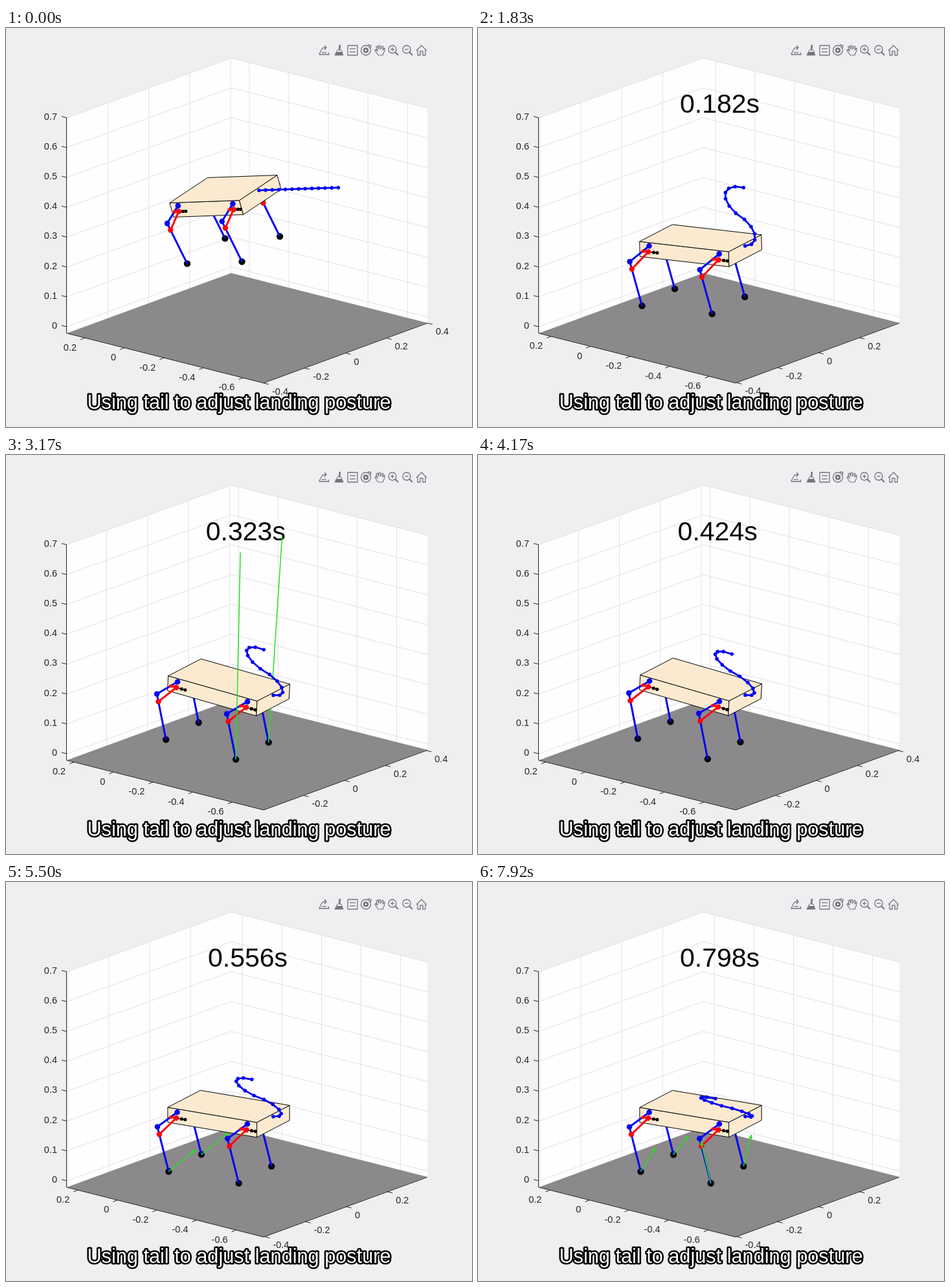
These frames come from a looping animation (720 px wide and 617 px high, 8 s). An HTML page with a canvas:

```html
<!DOCTYPE html>
<html lang="en">
<head>
<meta charset="utf-8">
<title>Landing posture</title>
<style>
html, body { margin: 0; width: 100%; height: 100%; overflow: hidden; background: #f0eef1; }
canvas { display: block; }
</style>
</head>
<body>
<canvas id="stage" width="720" height="617"></canvas>
<script>
const ctx = document.getElementById('stage').getContext('2d');
const LOOP = 8000, STEPS = [80, 170, 330, 420];
const BACK = '#f0eef1', INK = '#262626', TOOL = '#757478';
const BLUE = '#0505f0', RED = '#fa0510', BLACK = '#050505', GREEN = '#25e025';
const SANS = '"Liberation Sans", Arial, sans-serif';

const clamp = v => Math.max(0, Math.min(1, v));
const lerp = (a, b, k) => a + (b - a) * k;
const smooth = (from, to, n) => {
  const s = clamp((n - from) / (to - from));
  return s * s * (3 - 2 * s);
};
const add = (p, q, k = 1) => p.map((v, i) => v + q[i] * k);
const range = count => [...Array(count).keys()];

// Forward tilt while the robot rocks after touchdown
const rock = n => smooth(20, 34, n) - smooth(43, 56, n);

// Screen vector of a world vector (rearward, sideways, up)
const project = (x, y, z) => [306 * x + 316 * y, 51 * x - 164 * y - 462 * z];

function trace(pts, close) {
  ctx.beginPath();
  pts.forEach(p => ctx.lineTo(p[0], p[1]));
  if (close) ctx.closePath();
}
function line(pts, color, width = 1) {
  trace(pts);
  ctx.strokeStyle = color;
  ctx.lineWidth = width;
  ctx.stroke();
}
function face(pts, fill, edge) {
  trace(pts, true);
  ctx.fillStyle = fill;
  ctx.fill();
  if (edge) { ctx.strokeStyle = edge; ctx.lineWidth = 1; ctx.stroke(); }
}
function dot(p, r, color) {
  ctx.beginPath();
  ctx.arc(p[0], p[1], r, 0, 7);
  ctx.fillStyle = color;
  ctx.fill();
}
function label(text, x, y, size, align = 'left', color = INK) {
  ctx.font = `${size}px ${SANS}`;
  ctx.textAlign = align;
  ctx.fillStyle = color;
  ctx.fillText(text, x, y);
}

// The axes follow the body, so the ticks slide along the floor edges
const tickX = n => 122 - 10.7 * smooth(0, 24, n) - 6.5 * rock(n);
const tickY = n => 524.5 - Math.min(n, 7) / 7 + 2.5 * smooth(6, 11, n) - 3.4 * rock(n);

function drawAxes(n) {
  const grid = '#e1e0e3', wall = '#fefdff';
  const left = x => 472 + (x - 94) * 0.2533, right = x => 549 - (x - 398) * 0.3665;
  const xs = range(5).map(i => [(1 - i) / 5, tickX(n) + 61.1 * i]);
  const ys = range(5).map(i => [(i - 2) / 5, tickY(n) + 63.25 * (i - 2)])
    .filter(([, x]) => x > 397.7 && x < 651.3);
  const zs = range(8).map(i => [i / 10, 462 - 46.17 * i]);

  face([[94, 139], [348, 47], [348, 379], [94, 472]], wall);
  face([[348, 47], [651, 124], [651, 456], [348, 379]], wall);
  for (const [, y] of zs) line([[94, y], [348, y - 92.5], [651, y - 15]], grid);
  for (const [, x] of xs) line([[x + 254, left(x) - 93], [x + 254, left(x) - 425]], grid);
  for (const [, x] of ys) line([[x - 304, right(x) - 77], [x - 304, right(x) - 410]], grid);
  face([[94, 472], [348, 379], [651, 456], [398, 549]], '#8b898b');
  line([[93.5, 139], [93.5, 472], [398, 549], [651, 456.5]], INK);

  for (const [v, y] of zs) {
    line([[94, y], [86, y - 2]], INK);
    label(String(v), 79, y + 3, 14.5, 'right');
  }
  for (const [v, x] of xs) {
    line([[x, left(x)], [x - 7, left(x) + 2.6]], INK);
    label(String(v), x - 13, left(x) + 19.5, 14.5, 'right');
  }
  for (const [v, x] of ys) {
    line([[x, right(x)], [x + 8, right(x) + 2]], INK);
    label(String(v), x + 13, right(x) + 18, 14.5);
  }
}

function drawTools() {
  const stroke = (width, ...pts) => line(pts, TOOL, width);
  const ring = (x, y, r) => {
    ctx.beginPath();
    ctx.arc(x, y, r, 0, 7);
    ctx.strokeStyle = TOOL;
    ctx.lineWidth = 1.3;
    ctx.stroke();
  };
  // export
  stroke(1.3, [486, 36], [484, 41], [499, 41], [498, 38]);
  stroke(1.3, [486, 36], [489, 31], [495, 30], [492, 27]);
  stroke(1.3, [495, 30], [492, 34]);
  stroke(1.3, [488, 38], [495, 38]);
  // brush
  stroke(2.6, [516, 26], [515, 34]);
  face([[512, 34], [518, 34], [521, 42], [508, 42]], BACK, TOOL);
  face([[511, 37], [519, 37], [521, 42], [508, 42]], TOOL);
  // data tip
  stroke(1.3, [528, 27], [543, 27], [543, 42], [528, 42], [528, 27]);
  stroke(1.3, [531, 32], [540, 32]);
  stroke(1.3, [531, 37], [540, 37]);
  // rotate
  ring(556, 34.5, 7.5);
  face([[556, 30], [560, 32], [560, 37], [556, 39], [552, 37], [552, 32]], TOOL);
  dot([556, 34.5], 1.5, BACK);
  stroke(1.3, [559, 26], [564, 27], [563, 32]);
  // hand
  stroke(1.2, [575, 42], [570, 35], [571, 33], [574, 36], [572, 29], [574, 28], [576, 33], [576, 27],
    [578, 27], [579, 33], [581, 28], [583, 29], [582, 34], [585, 31], [585, 35], [582, 42], [575, 42]);
  // zoom in and out
  for (const x of [597, 619]) {
    ring(x, 33, 6);
    stroke(2, [x + 4, 37], [x + 9, 42]);
    stroke(1.3, [x - 3, 33], [x + 3, 33]);
  }
  stroke(1.3, [597, 30], [597, 36]);
  // home
  stroke(1.3, [634, 35], [642, 27], [650, 35]);
  stroke(1.3, [636, 34], [636, 42], [640, 42], [640, 36], [644, 36], [644, 42], [648, 42], [648, 34]);
}

// Rigid body: free fall with fading yaw, roll and pitch, then a damped landing
function bodyFrame(n) {
  const yaw = 0.18 * clamp(1 - n / 18);
  const roll = 0.2 * clamp(1 - n / 18) ** 1.4;
  const pitch = 0.19 * clamp(1 - n / 22) - 0.082 * rock(n);
  const d = n - 20;
  const y = d < 0 ? 260 + 0.1 * n + 0.2308 * n * n : 358.5 + (9 * d - 4) * Math.exp(-d / 2.5);
  const center = [339 + 5 * clamp(n / 18), y];
  const rear = project(Math.cos(yaw) * Math.cos(pitch), -Math.sin(yaw), Math.sin(pitch));
  const side = project(Math.sin(yaw), Math.cos(yaw), Math.sin(roll));
  const down = project(Math.sin(pitch), Math.sin(roll), -1);
  const at = (a, b, c) => add(add(add(center, rear, a), side, b), down, c);
  return { rear, side, down, at };
}

// Ground force of a leg as a screen vector, or nothing
function force(n, hind, far) {
  const sway = 9 * Math.sin((79 - n) * 2.3);
  if (n < 21 || (n > 36 && n < 47)) return null;
  if (n < 28) return [3, -70 - 8 * (n - 21)];
  if (n < 37) return hind ? [far ? 21 : 7, -320 * (1 - Math.abs(n - 32) / 6)] : null;
  if (n < 56) return hind ? null : [41, -33];
  if (hind) return far ? [12 - sway, -48] : [sway - 15, -64];
  return n % 5 === 3 && !far ? [-78, -12] : [23 + sway, far ? -28 : -36];
}

function drawForce(foot, f) {
  const tip = add(foot, f), a = Math.atan2(f[1], f[0]);
  const barb = turn => add(tip, [Math.cos(a + turn), Math.sin(a + turn)], -6);
  line([foot, tip], GREEN, 1.5);
  if (Math.hypot(...f) < 90) line([barb(0.35), tip, barb(-0.35)], GREEN, 1.5);
}

function drawLeg(n, { at }, hind, far) {
  const a = hind ? 0.177 : -0.177, b = far ? 0.08 : -0.08;
  const hip = at(a, b, -0.014), knee = at(a - 0.1, b, 0.046), foot = at(a - 0.043, b, 0.189);
  const joint = knee.map((v, i) => lerp(v, foot[i], 0.168));
  const [outer, inner, pin, end] = [-0.032, -0.005, 0.022, 0.04].map(x => at(a + x, b, 0.006));
  line([inner, end], BLACK, 1.5);
  dot(foot, 5.2, BLACK);
  line([hip, knee, foot], BLUE, 3);
  line([outer, inner, joint], RED, 3);
  for (const p of [hip, knee]) dot(p, 4.3, BLUE);
  for (const p of [inner, joint]) dot(p, 4.2, RED);
  dot(outer, 2.6, RED);
  for (const p of [pin, end]) dot(p, 2.6, BLACK);
  const f = force(n, hind, far);
  if (f) drawForce(foot, f);
}

function drawBox({ at }) {
  const fill = '#fbead0';
  const corner = (a, b, c) => at(0.225 * a, 0.08 * b, 0.025 * c);
  face([corner(-1, -1, -1), corner(1, -1, -1), corner(1, -1, 1), corner(-1, -1, 1)], fill, BLACK);
  face([corner(1, -1, -1), corner(1, 1, -1), corner(1, 1, 1), corner(1, -1, 1)], fill, BLACK);
  face([corner(-1, -1, -1), corner(1, -1, -1), corner(1, 1, -1), corner(-1, 1, -1)], fill, BLACK);
}

// Twelve equal links bend up to a peak angle and back, in a plane that slowly leans over
function drawTail(n, { rear, side, down, at }) {
  const link = 0.0427, rad = Math.PI / 180;
  const lean = 0.6 * (1 - Math.exp(-n / 8)) + 6.5e-5 * n * n;
  const first = 21 * clamp(n / 18);
  const peak = 145 * (1 - Math.exp(-n / 8));
  const last = -40 * Math.exp(-(((n - 9) / 4) ** 2));
  const rise = [0, 1].map(i => -0.86 * (Math.sin(lean) * side[i] + Math.cos(lean) * down[i]));
  const pts = [at(0.225, 0, -0.016)];
  for (const i of range(12)) {
    const bend = rad * (i < 5 ? lerp(first, peak, i / 5) : lerp(peak, last, (i - 5) / 6));
    pts.push(add(add(pts[i], rear, link * Math.cos(bend)), rise, link * Math.sin(bend)));
  }
  line(pts, BLUE, 2.8);
  pts.forEach(p => dot(p, 2.8, BLUE));
}

function drawRobot(n) {
  const frame = bodyFrame(n);
  drawLeg(n, frame, false, true);
  drawLeg(n, frame, true, true);
  drawBox(frame);
  drawLeg(n, frame, false, false);
  drawLeg(n, frame, true, false);
  drawTail(n, frame);
}

function drawClock(n) {
  const x = tickY(n);
  label(Number((n / 99).toPrecision(3)) + 's', x - 214, 131.5 + (525 - x) * 0.37, 41, 'left', BLACK);
}

function drawCaption() {
  const text = 'Using tail to adjust landing posture';
  ctx.font = `30.7px ${SANS}`;
  ctx.textAlign = 'center';
  ctx.strokeStyle = '#000';
  ctx.lineWidth = 5;
  ctx.strokeText(text, 360, 589);
  label(text, 360, 589, 30.7, 'center', '#fff');
}

function draw(ms) {
  const n = 5 * Math.floor(ms / 500) + STEPS.filter(s => s <= ms % 500).length;
  ctx.lineJoin = 'round';
  ctx.fillStyle = BACK;
  ctx.fillRect(0, 0, 720, 617);
  drawTools();
  drawAxes(n);
  if (n) drawClock(n);
  drawRobot(n);
  drawCaption();
}

const start = performance.now();
function tick() {
  draw((performance.now() - start) % LOOP);
  requestAnimationFrame(tick);
}
tick();
</script>
</body>
</html>
```
